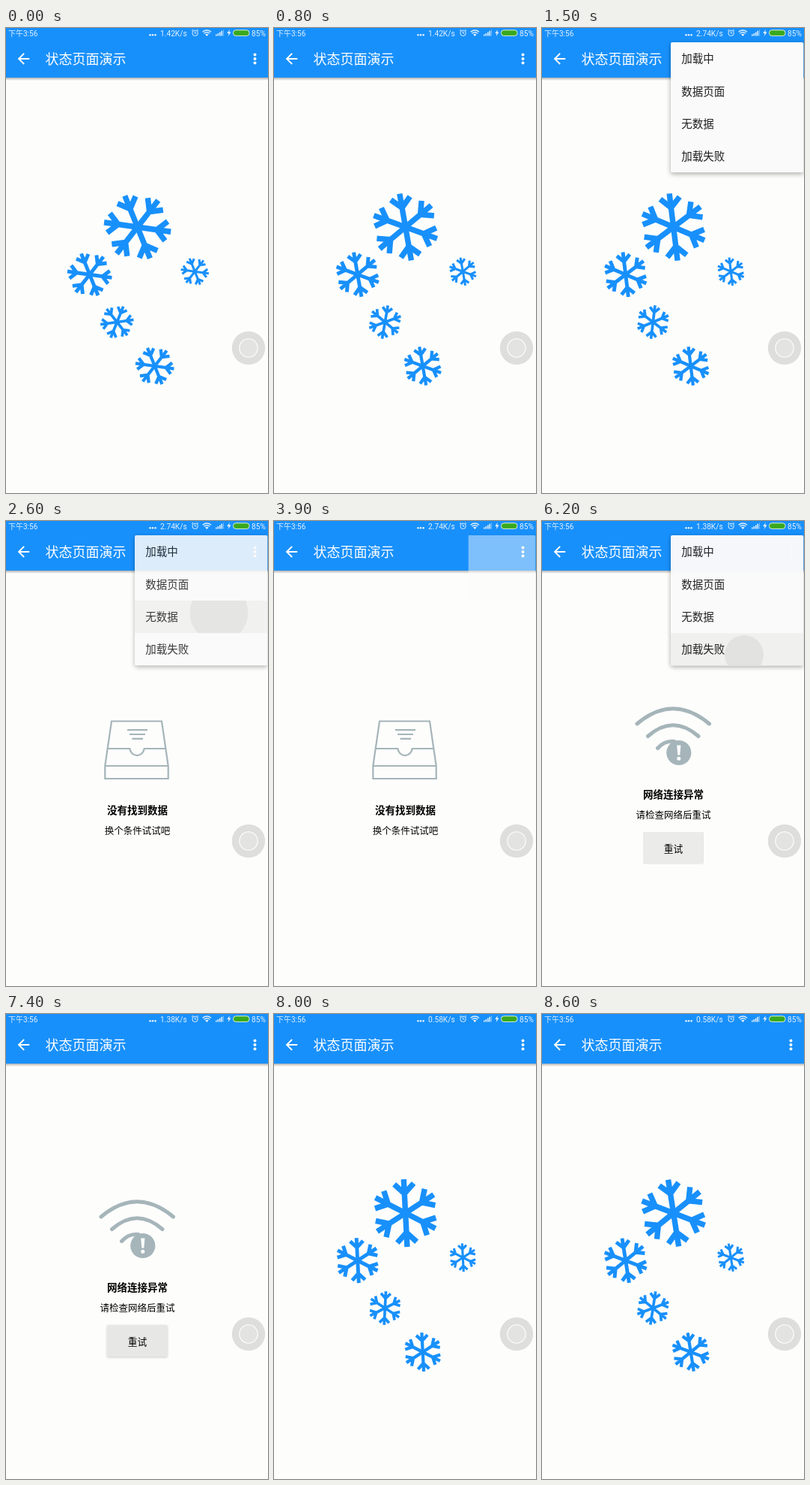
These frames come from a looping animation (350x619 px, 8.7 s). An HTML page:

```html
<!DOCTYPE html>
<html lang="zh-CN">
<head>
<meta charset="utf-8">
<title>状态页面演示</title>
<style>
html, body { margin: 0; width: 100%; height: 100%; overflow: hidden; background: #fdfdfc; }
svg { display: block; width: 100vw; height: 100vh; }
text { font-family: Roboto, "Noto Sans CJK SC", "Noto Sans CJK", sans-serif; }
.bar text { font-size: 10.2px; fill: #e4f1ff; }
.items text { font-size: 14.5px; fill: #1e1e1e; }
.mid { text-anchor: middle; }
.head { font-size: 13.5px; font-weight: 700; }
.note { font-size: 12.5px; }
.panel { filter: drop-shadow(0 2px 3px rgba(0,0,0,.34)); }
.line { fill: none; stroke: #a5b5b9; }
</style>
</head>
<body>
<svg viewBox="0 0 350 619">
  <defs>
    <linearGradient id="shade" x2="0" y2="1">
      <stop stop-color="#000" stop-opacity=".3"/>
      <stop offset="1" stop-color="#000" stop-opacity="0"/>
    </linearGradient>
    <g id="flake" fill="none" stroke="#1890fb" stroke-width="7.4"></g>
    <clipPath id="reveal"><rect id="revealBox" y="0"/></clipPath>
    <clipPath id="rowClip"><rect id="rowBox" x="172" width="177" height="43.2"/></clipPath>
  </defs>

  <rect width="350" height="619" fill="#fdfdfc"/>
  <rect y="66" width="350" height="4" fill="url(#shade)"/>
  <rect width="350" height="66" fill="#1890fb"/>

  <g class="bar">
    <text x="3" y="10.8" style="font-size:10px">下午3:56</text>
    <g fill="#e4f1ff"><circle cx="192.5" cy="9.3" r="1.3"/><circle cx="196" cy="9.3" r="1.3"/><circle cx="199.6" cy="9.3" r="1.3"/></g>
    <text id="speed" x="206" y="10.6"></text>
    <g fill="none" stroke="#e4f1ff" stroke-width="1">
      <circle cx="252.6" cy="6.8" r="3.7"/>
      <path d="M252.4 4.6V7H254.4M248 3.8L250 2M257.2 3.8L255.2 2"/>
      <path d="M262.6 5.2Q268.3 .8 274 5.2M264.4 7.3Q268.3 4.3 272.2 7.3" stroke-width="1.4"/>
    </g>
    <path d="M266 8.4Q268.3 6.9 270.6 8.4L268.3 11Z" fill="#e4f1ff"/>
    <path d="M280 8.6h1.6v2H280zM282.5 7h1.6v3.6h-1.6zM285 5.4h1.6v5.2H285zM287.5 3.8h1.6v6.8h-1.6z" fill="#e4f1ff"/>
    <path d="M290 2.6h1v8h-1z" fill="#e4f1ff" opacity=".5"/>
    <path d="M298.8 2L295.2 7H297.5L296.6 11L300.6 5.6H298.2Z" fill="#e4f1ff"/>
    <rect x="303.5" y="2.8" width="21.5" height="7.6" rx="3.6" fill="#39a91e" stroke="#d7efe0"/>
    <text x="328" y="10.6">85%</text>
  </g>
  <path d="M20 11H7.83l5.59-5.59L12 4l-8 8 8 8 1.41-1.41L7.83 13H20z" transform="translate(11.8 29.3) scale(.972)" fill="#fff"/>
  <text x="52.5" y="47.7" font-size="18" fill="#fff">状态页面演示</text>
  <g fill="#fff"><circle cx="332.5" cy="35.5" r="2"/><circle cx="332.5" cy="41" r="2"/><circle cx="332.5" cy="46.5" r="2"/></g>

  <g id="snow"></g>

  <g id="empty">
    <g class="line" stroke-width="2.2">
      <path d="M132.3 326L141 266.5H208L216.7 326V343H132.3ZM132.3 326H216.7"/>
      <path d="M135.6 303H165.3A9.8 10.6 0 0 0 184.7 303H213.4"/>
      <path d="M162 278.2H189M165 284H186M168.5 289.8H183"/>
    </g>
    <text class="mid head" x="175.5" y="390">没有找到数据</text>
    <text class="mid note" x="175.5" y="417">换个条件试试吧</text>
  </g>

  <text id="data" class="mid" x="175.3" y="351.7" font-size="12.7" fill="#696969">数据页面</text>

  <g id="fail">
    <path class="line" stroke-width="5" stroke-linecap="round" d="M127 270Q175 229.5 223.5 270M141.5 286.5Q175 257 209 286.5M154.5 302.5Q164 292 177 293.5"/>
    <circle cx="182.8" cy="308.5" r="16.6" fill="#a5b5b9"/>
    <path d="M180.2 298.5H185.4L184.3 311.5H181.3Z" fill="#fff"/>
    <circle cx="182.8" cy="316.2" r="2.5" fill="#fff"/>
    <text class="mid head" x="175.5" y="369">网络连接异常</text>
    <text class="mid note" x="175.5" y="395.8">请检查网络后重试</text>
    <rect id="button" x="135" y="414" width="80.5" height="42.3" rx="1.5"/>
    <text class="mid" x="175.5" y="440.6" font-size="12.7">重试</text>
  </g>

  <circle cx="324" cy="426" r="22.2" fill="#dededd"/>
  <circle cx="324" cy="426" r="12.2" fill="#e3e3e2" stroke="#fff" stroke-width="1.1"/>

  <g id="menu" clip-path="url(#reveal)">
    <rect class="panel" x="172" y="19" width="177.3" height="173.2" rx="2" fill="#fafafa"/>
    <g id="press" clip-path="url(#rowClip)">
      <rect x="172" y="19" width="177" height="174" fill="#f0f0ef"/>
      <circle id="ripple" fill="#e2e2e1"/>
    </g>
    <g class="items" id="items"></g>
  </g>
</svg>
<script>
const LOOP = 8700, STEP = 100, FADE = 270, RETRY = 7400, RELOAD = 7600;
const $ = id => document.getElementById(id);
const clamp = v => Math.max(0, Math.min(1, v));
const set = (el, attrs) => { for (const k in attrs) el.setAttribute(k, attrs[k]); };
const add = (parent, name, attrs) => {
  const el = document.createElementNS('http://www.w3.org/2000/svg', name);
  set(el, attrs);
  return parent.appendChild(el);
};

// open, press and close times, pressed row and touch point
const menus = [
  { open: 1130, press: 2450, close: 2505, row: 2, x: 284.5, y: 122, view: 'empty' },
  { open: 3830, press: 4495, close: 4527, row: 1, x: 278, y: 86, view: 'data' },
  { open: 5530, press: 6100, close: 6162, row: 3, x: 270, y: 178, view: 'fail' }
];
const speeds = [[0, '1.42K/s'], [1000, '2.74K/s'], [4400, '1.38K/s'], [7900, '0.58K/s']];
const views = ['snow', 'empty', 'data', 'fail'];

for (let a = 0; a < 360; a += 60)
  add($('flake'), 'path', { d: 'M0 0H45M39 -13L26 0L39 13', transform: `rotate(${a})` });

// centre, radius, turning direction
const flakes = [
  [175.6, 265, 45, 1], [111.7, 328.2, 30, 1], [148.3, 391.5, 22.4, -1],
  [198.7, 450, 26, 1], [252.3, 324.2, 18.8, 1]
].map(([x, y, r, dir]) => ({ x, y, r, dir, el: add($('snow'), 'use', { href: '#flake' }) }));

['加载中', '数据页面', '无数据', '加载失败'].forEach((label, i) => {
  add($('items'), 'text', { x: 186.3, y: 46.2 + i * 43.3 }).textContent = label;
});

function drawMenu(t) {
  const m = menus.find(m => t > m.open && t < m.close + FADE);
  $('menu').style.display = m ? '' : 'none';
  if (!m) return;
  const grow = clamp((t - m.open) / FADE), ease = 1 - (1 - grow) ** 2;
  const out = clamp((t - m.close) / FADE);
  $('menu').style.opacity = ease * (1 - out * out);
  set($('revealBox'), { x: 350 - 200 * ease, width: 200 * ease, height: 15 + 200 * ease });
  const held = t > m.press;
  $('press').style.display = held ? '' : 'none';
  if (held) {
    set($('rowBox'), { y: 19.6 + 43.2 * m.row });
    set($('ripple'), { cx: m.x, cy: m.y, r: 0.26 * (t - m.press) });
  }
}

function draw(t) {
  let view = 'snow';
  for (const m of menus) if (t >= m.close) view = m.view;
  if (t >= RELOAD) view = 'snow';
  for (const v of views) $(v).style.display = v === view ? '' : 'none';

  $('speed').textContent = speeds.filter(s => t >= s[0]).pop()[1];

  const angle = t < RELOAD ? 8 + 0.09 * t : 21 + 0.09 * (t - 8600);
  for (const f of flakes)
    set(f.el, { transform: `translate(${f.x} ${f.y}) rotate(${f.dir * angle}) scale(${f.r / 45})` });

  const down = t >= RETRY;
  $('button').style.fill = down ? '#e7e7e6' : '#ebebea';
  $('button').style.filter = `drop-shadow(0 ${down ? 1 : .4}px ${down ? 1.5 : .5}px rgba(0,0,0,.2))`;
  drawMenu(t);
}

function tick(now) {
  draw(Math.floor((now % LOOP) / STEP) * STEP);
  requestAnimationFrame(tick);
}
draw(0);
requestAnimationFrame(tick);
</script>
</body>
</html>
```
